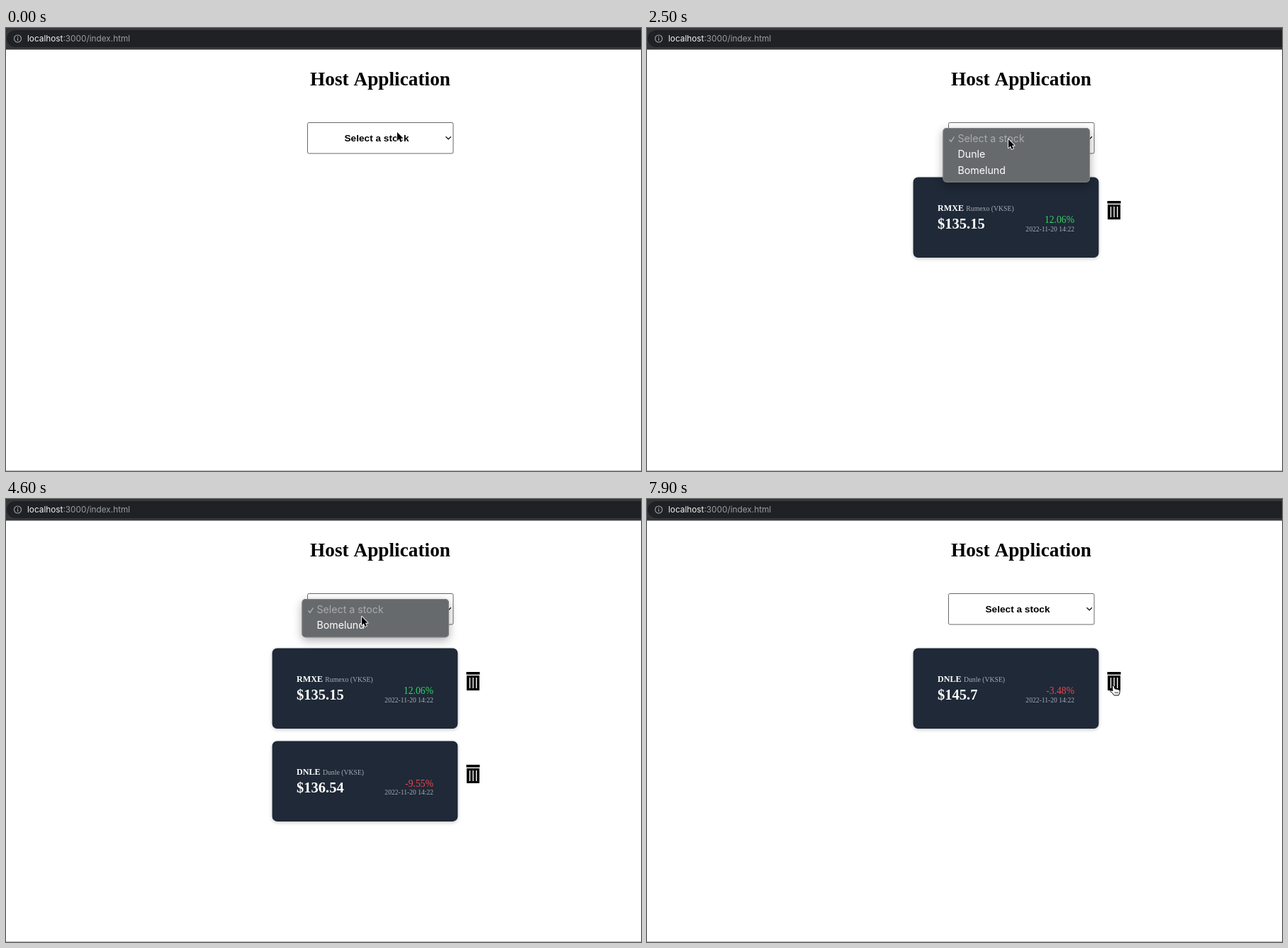
Recreate the animation shown at these times as an HTML page with a canvas. Size 896x625 px, loop 8 s.

```html
<!DOCTYPE html>
<html lang="en">
<head>
<meta charset="utf-8">
<title>Host Application</title>
<style>
html, body { margin: 0; width: 100%; height: 100%; overflow: hidden; background: #fff; }
canvas { display: block; }
</style>
</head>
<body>
<canvas id="stage" width="896" height="625"></canvas>
<script>
const ctx = document.getElementById('stage').getContext('2d');
const LOOP = 8000, STEP = 100;
const SANS = 'Inter, sans-serif', SERIF = '"Liberation Serif", serif';
const GREEN = '#34d366', RED = '#ef4550';

const stocks = [
  { code: 'RMXE', name: 'Rumexo', from: 1600, to: 7000,
    quotes: [[0, '$135.15', '12.06%'], [5500, '$135.94', '12.71%']] },
  { code: 'DNLE', name: 'Dunle', from: 3400, to: LOOP,
    quotes: [[0, '$136.54', '-9.55%'], [7000, '$145.7', '-3.48%']] },
  { code: 'BML', name: 'Bomelund', from: 5500, to: 6100,
    quotes: [[0, '$34.08', '29.23%']] }
];

// Each menu opens, highlights its first stock, blinks off for one step, then fades.
const menus = [
  { open: 100, hover: 800, blink: 1300, fade: 1500, close: 1700 },
  { open: 2400, hover: 2900, blink: 3100, fade: 3300, close: 3400 },
  { open: 4200, hover: 4700, blink: 5200, fade: 5400, close: 5500 }
];
const focusSpans = [[1600, 2400], [3400, 4200], [5500, 6100]];
const handSpans = [[5900, 6100], [6800, LOOP]];

// Pointer keys: time, x, y
const pointerKeys = [
  [0, 552, 147], [600, 552, 147], [900, 508, 181], [1700, 508, 181], [1900, 510, 172],
  [2100, 510, 172], [2300, 510, 157], [2800, 510, 157], [3000, 507, 175],
  [3400, 507, 175], [3500, 502, 173], [3700, 502, 174], [4200, 502, 153],
  [4500, 502, 153], [4600, 502, 166], [4800, 502, 176], [5500, 502, 176],
  [5800, 680, 512], [6000, 667, 512], [6100, 670, 512], [6400, 670, 512],
  [6900, 659, 269], [7700, 659, 269], [7800, 659, 267], [7900, 659, 263], [LOOP, 659, 263]
];

const within = (t, [a, b]) => t >= a && t < b;

function text(str, x, y, font, color, align = 'left') {
  ctx.font = font;
  ctx.fillStyle = color;
  ctx.textAlign = align;
  ctx.fillText(str, x, y);
  return ctx.measureText(str).width;
}

function box(x, y, w, h, r, fill, stroke, line = 1) {
  ctx.beginPath();
  ctx.roundRect(x, y, w, h, r);
  if (fill) { ctx.fillStyle = fill; ctx.fill(); }
  if (stroke) { ctx.strokeStyle = stroke; ctx.lineWidth = line; ctx.stroke(); }
}

function shadow(color, blur, dy) {
  ctx.shadowColor = color;
  ctx.shadowBlur = blur;
  ctx.shadowOffsetY = dy;
}

function polyline(points, color, width) {
  ctx.beginPath();
  points.forEach(([x, y]) => ctx.lineTo(x, y));
  ctx.strokeStyle = color;
  ctx.lineWidth = width;
  ctx.stroke();
}

function drawPage(focused) {
  box(0, 0, 896, 625, 0, '#fff');
  box(0, 0, 896, 30.5, 0, '#35363a');
  box(1, 3, 920, 24, 12, '#202124');
  box(0, 624, 896, 1, 0, '#b8b8b8');
  box(11.5, 10, 10, 10, 5, null, '#a4a7ab', 1.1);
  box(16, 14.2, 1.1, 3.6, 0, '#a4a7ab');
  box(16, 12.1, 1.1, 1.2, 0, '#a4a7ab');
  const font = '11.8px ' + SANS;
  const w = text('localhost', 30, 19, font, '#f1f2f3');
  text(':3000/index.html', 30 + w, 19, font, '#9b9ea3');

  text('Host Application', 528, 81, 'bold 27.3px ' + SERIF, '#000', 'center');
  if (focused) box(425.5, 133.5, 205, 43, 2, '#fff', '#1560c6', 2);
  else box(425.5, 133.5, 205.5, 43.5, 2, '#fff', '#68686a');
  text('Select a stock', 523, 160, 'bold 13.65px "Liberation Sans", sans-serif', '#000', 'center');
  polyline([[620.5, 153.2], [624.2, 156.8], [627.9, 153.2]], '#111', 1.2);
}

function drawCard(stock, y, t) {
  const [, price, change] = stock.quotes.filter(q => q[0] <= t).pop();
  shadow('rgba(0,0,0,.22)', 5, 1.5);
  box(375.6, y, 261.8, 113.5, 7, '#1f2937');
  shadow('transparent', 0, 0);
  const w = text(stock.code, 410, y + 47.5, 'bold 12.1px ' + SERIF, '#fff');
  text(`${stock.name} (VKSE)`, 413.3 + w, y + 47.5, '9.75px ' + SERIF, '#a5abb5');
  text(price, 410, y + 72.3, 'bold 20.5px ' + SERIF, '#fff');
  text(change, 603, y + 64.5, '13.65px ' + SERIF, change[0] === '-' ? RED : GREEN, 'right');
  text('2022-11-20 14:22', 603, y + 76, '9.6px ' + SERIF, '#a5abb5', 'right');

  box(649.5, y + 33.5, 19, 3.7, 0, '#000');
  box(650, y + 38.6, 18, 21, 0, '#000');
  for (const x of [653.8, 658.4, 663]) box(x, y + 41.6, 1.4, 15, 0, '#fff');
}

function drawMenu(menu, index, t) {
  const items = ['Select a stock', ...stocks.slice(index).map(s => s.name)];
  const height = 9.5 + 22.4 * items.length;
  const lit = t >= menu.hover && t !== menu.blink;
  ctx.globalAlpha = t < menu.fade ? 1 : t < menu.fade + STEP ? 0.6 : 0.25;
  shadow('rgba(0,0,0,.32)', 13, 4);
  box(417.5, 141, 207.5, height, 5, '#676a6c');
  shadow('transparent', 0, 0);
  box(418, 141.5, 206.5, height - 1, 5, null, '#7d8082');
  if (lit) box(422, 167.5, 199, 22.4, 4, '#2f6fd0');
  items.forEach((item, i) =>
    text(item, 438.5, 161 + 22.4 * i, '14.2px ' + SANS, i ? '#fff' : '#a9abad'));
  polyline([[426.5, 157.5], [429, 160.3], [433.5, 153.5]], '#b5b7b8', 1.3);
  ctx.globalAlpha = 1;
}

const arrow = new Path2D('M0 0V12.2L2.8 9.6L4.7 14L6.9 13L5 8.8H8.6Z');
const hand = new Path2D('M-2.5 1Q-1.2-.6 0 1L1.4 5.2Q3 4.1 4 5.5Q5.6 4.7 6.4 6.2Q8 6 8.2 8L7.8 11L6.4 14H.2L-2.2 11L-5 8.5Q-5-.1-5 7Q-3.8 6.4-2 8Z');

function drawPointer(t, isHand) {
  const next = pointerKeys.findIndex(k => k[0] > t);
  const [t0, x0, y0] = pointerKeys[next - 1], [t1, x1, y1] = pointerKeys[next];
  const p = (t - t0) / (t1 - t0);
  ctx.save();
  ctx.translate(x0 + (x1 - x0) * p, y0 + (y1 - y0) * p);
  ctx.lineJoin = 'round';
  ctx.lineWidth = isHand ? 1 : 1.8;
  ctx.strokeStyle = isHand ? '#000' : '#fff';
  ctx.fillStyle = isHand ? '#fff' : '#000';
  const shape = isHand ? hand : arrow;
  if (isHand) { ctx.fill(shape); ctx.stroke(shape); }
  else { ctx.stroke(shape); ctx.fill(shape); }
  if (isHand) for (const x of [1.6, 3.4, 5.2]) polyline([[x, 9], [x, 11.5]], '#000', 0.7);
  ctx.restore();
}

function draw(now) {
  const t = Math.floor(now % LOOP / STEP) * STEP;
  drawPage(focusSpans.some(s => within(t, s)));
  stocks.filter(s => within(t, [s.from, s.to]))
    .forEach((s, row) => drawCard(s, 210.5 + 130.9 * row, t));
  menus.forEach((m, i) => { if (within(t, [m.open, m.close])) drawMenu(m, i, t); });
  drawPointer(t, handSpans.some(s => within(t, s)));
  requestAnimationFrame(draw);
}
requestAnimationFrame(draw);
</script>
</body>
</html>
```
